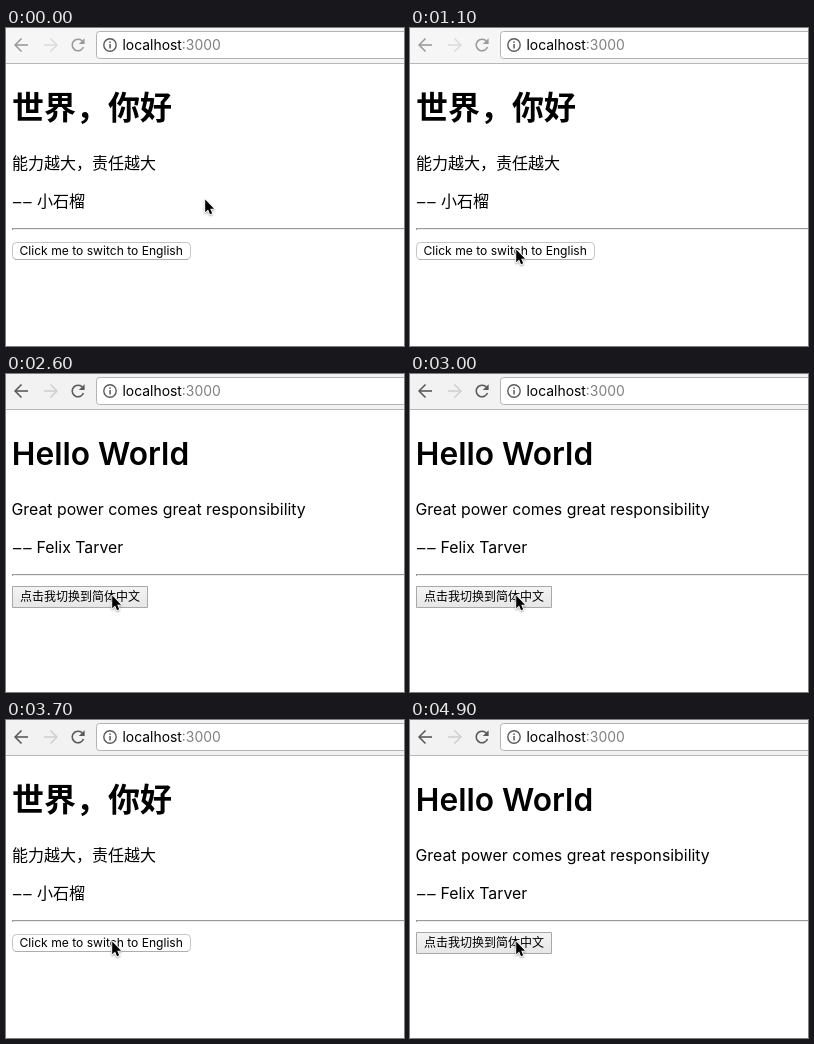
Animation of 398 by 318 pixels, one loop 5.1 s. Source, as an HTML page with a canvas:

```html
<!DOCTYPE html>
<html lang="zh-CN">
<head>
<meta charset="utf-8">
<title>Language switch</title>
<style>
  html, body { margin: 0; width: 100%; height: 100%; overflow: hidden; background: #fff; }
  canvas { display: block; width: 398px; height: 318px; }
</style>
</head>
<body>
<canvas id="stage"></canvas>
<script>
const W = 398, H = 318, LOOP = 5100, STEP = 100;
const LATIN = 'Inter, "Noto Sans", sans-serif';
const CJK = '"Noto Sans CJK SC", "Noto Sans CJK", sans-serif';

const canvas = document.getElementById('stage');
const ratio = window.devicePixelRatio || 1;
canvas.width = W * ratio;
canvas.height = H * ratio;
const ctx = canvas.getContext('2d');

// Pointer tip at each 100 ms step; it rests on the last point.
const pointerPath = [
  [198, 170], [195, 175], [184, 189], [166, 207], [147, 219], [140, 221],
  [150, 221], [160, 220], [139, 219], [112, 219], [102, 220], [105, 220]
];
const clicks = [1500, 2400, 3500, 4400];
const HOLD = 200;

function rect(x, y, w, h, color) {
  ctx.fillStyle = color;
  ctx.fillRect(x, y, w, h);
}

function text(str, x, y, font, color = '#000') {
  ctx.font = font;
  ctx.fillStyle = color;
  ctx.fillText(str, x, y);
}

function line(points, color, width) {
  ctx.beginPath();
  for (const [x, y] of points) ctx.lineTo(x, y);
  ctx.strokeStyle = color;
  ctx.lineWidth = width;
  ctx.stroke();
}

function circle(x, y, r, color, width) {
  ctx.beginPath();
  ctx.arc(x, y, r, 0, Math.PI * 2);
  ctx.strokeStyle = color;
  ctx.lineWidth = width;
  ctx.stroke();
}

function box(x, y, w, h, r, fill, border) {
  ctx.beginPath();
  ctx.roundRect(x + 0.5, y + 0.5, w - 1, h - 1, r);
  ctx.fillStyle = fill;
  ctx.fill();
  ctx.strokeStyle = border;
  ctx.lineWidth = 1;
  ctx.stroke();
}

function arrow(x, dir, color) {
  line([[x + dir, 17], [x + dir * 13.5, 17]], color, 1.6);
  line([[x + dir * 7, 10.5], [x + dir * 0.6, 17], [x + dir * 7, 23.5]], color, 1.6);
}

function reload(color) {
  ctx.beginPath();
  ctx.arc(72, 17, 5.8, 0.35, Math.PI * 1.76);
  ctx.strokeStyle = color;
  ctx.lineWidth = 1.6;
  ctx.stroke();
  ctx.beginPath();
  ctx.moveTo(78.6, 10.2);
  ctx.lineTo(78.6, 16);
  ctx.lineTo(72.8, 16);
  ctx.fillStyle = color;
  ctx.fill();
}

function toolbar(active) {
  const icon = active ? '#5a5a5a' : '#9b9b9b';
  rect(0, 0, W, 35, active ? '#f2f2f2' : '#f6f6f6');
  rect(0, 35, W, 1, '#b8b8b8');
  arrow(8.5, 1, icon);
  arrow(51.5, -1, active ? '#d0d0d0' : '#dcdcdc');
  reload(icon);
  box(90, 3, 330, 28, 3, '#fff', '#b4b4b4');
  circle(104, 17, 6.2, '#5a5a5a', 1.4);
  rect(103.3, 13.4, 1.5, 1.5, '#5a5a5a');
  rect(103.3, 16, 1.5, 4.5, '#5a5a5a');
  const font = '13.9px ' + LATIN;
  text('localhost', 116.5, 22, font);
  text(':3000', 116.5 + ctx.measureText('localhost').width, 22, font, '#808080');
}

function page(english) {
  text('−−', 6, 180.5, '18px "Open Sans", "Noto Sans", sans-serif');
  rect(6, 200, W, 1, '#9a9a9a');
  rect(6, 201, 1, 1, '#9a9a9a');
  rect(7, 201, W, 1, '#eee');
  if (english) {
    const body = '15.85px ' + LATIN;
    text('Hello World', 5.8, 91, '600 31.7px ' + LATIN);
    text('Great power comes great responsibility', 5.5, 141, body);
    text('Felix Tarver', 30.5, 179, body);
    const shade = ctx.createLinearGradient(0, 212, 0, 234);
    shade.addColorStop(0, '#f4f4f4');
    shade.addColorStop(1, '#e6e6e6');
    box(6, 212, 136, 22, 0, shade, '#a8a8a8');
    text('点击我切换到简体中文', 14, 227, '12px ' + CJK);
  } else {
    const body = '16px ' + CJK;
    text('世界，你好', 6, 91, '600 32px ' + CJK);
    text('能力越大，责任越大', 6, 141, body);
    text('小石榴', 31, 179, body);
    box(6, 214, 179, 18, 4, '#fff', '#c4c4c4');
    rect(9, 231, 173, 1, '#aeaeae');
    text('Click me to switch to English', 13.5, 227, '12.1px ' + LATIN);
  }
}

function pointer(x, y) {
  ctx.save();
  ctx.translate(x + 1.2, y + 1.6);
  ctx.scale(0.88, 0.88);
  ctx.beginPath();
  for (const [px, py] of [[0, 0], [0, 14.4], [3.3, 11.3], [5.5, 16.6],
                          [7.9, 15.6], [5.7, 10.5], [10.1, 10.3]]) ctx.lineTo(px, py);
  ctx.closePath();
  ctx.lineJoin = 'round';
  ctx.shadowColor = 'rgba(0,0,0,.35)';
  ctx.shadowBlur = 2 * ratio;
  ctx.shadowOffsetY = ratio;
  ctx.strokeStyle = '#fff';
  ctx.lineWidth = 2;
  ctx.stroke();
  ctx.shadowColor = 'transparent';
  ctx.fillStyle = '#000';
  ctx.fill();
  ctx.restore();
}

function draw(now) {
  const t = Math.floor((now % LOOP) / STEP) * STEP;
  // The first click only activates the window; each later one toggles the language.
  const toggles = clicks.slice(1).filter(c => t >= c + HOLD).length;
  const [x, y] = pointerPath[Math.min(t / STEP, pointerPath.length - 1)];

  ctx.setTransform(ratio, 0, 0, ratio, 0, 0);
  rect(0, 0, W, H, '#fff');
  toolbar(t >= clicks[0] + STEP);
  page(toggles % 2 === 1);
  if (clicks.some(c => t >= c && t < c + HOLD)) circle(106, 223, 20, '#000', 2.8);
  pointer(x, y);
}

function tick() {
  draw(performance.now());
  requestAnimationFrame(tick);
}
tick();
</script>
</body>
</html>
```
